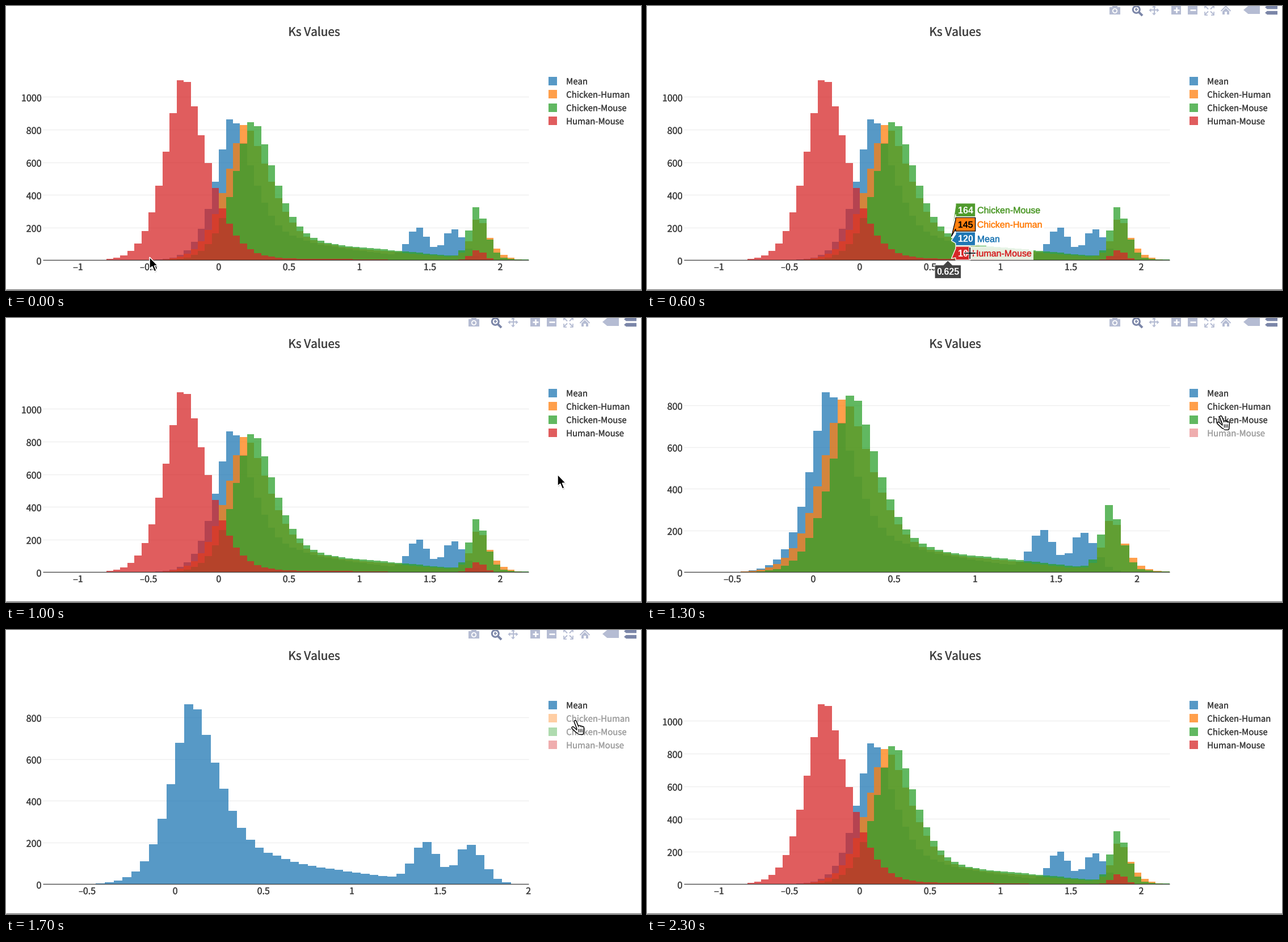
Animation, 1119 px wide and 501 px high, one loop 2.4 s. Source, as a matplotlib script:

```python
import itertools
import math

import matplotlib.patheffects as pe
import matplotlib.pyplot as plt
import numpy as np
from matplotlib.animation import FuncAnimation
from matplotlib.patches import Circle, Polygon, Rectangle

W, H, FRAMES, STEP = 1119, 501, 24, 100
LEFT, RIGHT, BASE, PEAK = 65, 921, 448.4, 317
X0, BIN, NBINS = -1.25, 0.05, 69
EDGES = X0 + BIN * np.arange(NBINS + 1)
MIDS = EDGES[:-1] + BIN / 2
UI, SANS = "Noto Sans CJK JP", "Liberation Sans"
INK, FADED, ICON, ACTIVE = "#404040", "#a1a1a1", "#b5bcd3", "#7b86a8"


def hump(height, mid, left, right, power=2.0):
    """A bell with its own width on either side."""
    d = MIDS - mid
    return height * np.exp(-np.abs(d / np.where(d < 0, left, right)) ** power)


def counts(lo, hi, *humps):
    n = np.maximum(np.round(sum(humps)), 2)
    return np.where((MIDS > lo) & (MIDS < hi), n, 0)


SERIES = [
    ("Mean", "#1f77b4", counts(
        -0.75, 2.0, hump(890, 0.09, 0.16, 0.243, 1.45),
        hump(81.5, 0.62, 0.2, 0.65),
        hump(185, 1.415, 0.094, 0.1), hump(185, 1.66, 0.085, 0.115))),
    ("Chicken-Human", "#ff7f0e", counts(
        -0.8, 2.2, hump(835, 0.185, 0.2, 0.275, 1.55),
        hump(70, 0.85, 0.3, 0.7), hump(262, 1.84, 0.069, 0.108, 1.5))),
    ("Chicken-Mouse", "#2ca02c", counts(
        -0.65, 2.2, hump(860, 0.24, 0.191, 0.2385, 1.55),
        hump(82, 0.8, 0.3, 0.8), hump(310, 1.83, 0.07, 0.096, 1.8))),
    ("Human-Mouse", "#d62728", counts(
        -1.25, 2.2, hump(1139, -0.255, 0.18, 0.238, 1.53),
        hump(9, 0.6, 0.5, 0.6), hump(62, 1.84, 0.069, 0.067))),
]
HOVER = ["#1f77b4", "#ff7f0e", "#509b2d", "#d62728"]

# Frames between which each trace is switched off.
HIDDEN = [(FRAMES, FRAMES), (16, 18), (14, 19), (13, 21)]
# Cursor tip: frame, x, y.
PATH = [(0, 253, 443), (1, 218, 425), (4, 420, 400), (6, 569, 436),
        (10, 972, 276), (13, 1010, 173), (16, 1002, 160), (18, 1002, 160),
        (20, 1002, 208), (22, 1006, 170)]

ARROW = np.array([(0, 0), (0, 20.5), (4.7, 16.4), (8.4, 25.4), (12, 23.8),
                  (8.3, 15.2), (14.6, 15.2)])

fig = plt.figure(figsize=((W + 1e-4) / 72, (H + 1e-4) / 72), dpi=72,
                 facecolor="white")
ax = fig.add_axes([0, 0, 1, 1])
order = itertools.count(1)


def poly(pts, fill, edge="none", lw=0.0, **kw):
    ax.add_patch(Polygon(pts, closed=True, facecolor=fill, edgecolor=edge,
                         linewidth=lw, zorder=next(order), **kw))


def rect(x, y, w, h, fill, **kw):
    ax.add_patch(Rectangle((x, y), w, h, facecolor=fill, edgecolor="none",
                           linewidth=0, zorder=next(order), **kw))


def disc(x, y, r, fill, edge="none", lw=0.0):
    ax.add_patch(Circle((x, y), r, facecolor=fill, edgecolor=edge,
                        linewidth=lw, zorder=next(order)))


def line(xs, ys, color, lw, cap="butt"):
    ax.plot(xs, ys, color=color, lw=lw, solid_capstyle=cap,
            zorder=next(order))


def text(x, y, s, size, color=INK, font=UI, ha="left", bold=False):
    """Text whose regular weight is thickened by a hairline."""
    effects = [] if bold else [pe.withStroke(linewidth=0.35,
                                             foreground=color)]
    return ax.text(x, y, s, fontsize=size, color=color, family=font, ha=ha,
                   va="baseline", weight="bold" if bold else "normal",
                   path_effects=effects, zorder=next(order))


def width(t):
    return t.get_window_extent().width


class View:
    """Maps data to pixels for a set of visible traces."""

    def __init__(self, shown):
        tops = np.max([SERIES[i][2] for i in shown], axis=0)
        used = np.nonzero(tops)[0]
        self.lo, self.hi = EDGES[used[0]], EDGES[used[-1] + 1]
        self.kx = (RIGHT - LEFT) / (self.hi - self.lo)
        self.top = tops.max()
        self.ky = PEAK / self.top

    def x(self, v):
        return LEFT + (v - self.lo) * self.kx

    def y(self, v):
        return BASE - v * self.ky


def draw_grid(v):
    for n in range(200, int(v.top) + 1, 200):
        line([LEFT, RIGHT], [v.y(n)] * 2, "#eeeeee", 1.3)


def draw_bars(v, shown):
    for i in shown:
        _, color, n = SERIES[i]
        xs = np.repeat(v.x(EDGES), 2)
        ys = np.concatenate([[BASE], np.repeat(v.y(n), 2), [BASE]])
        pts = np.column_stack([np.clip(xs, LEFT, RIGHT), ys])
        poly(pts, color, alpha=0.75)
    line([LEFT, RIGHT], [BASE] * 2, INK, 1.3)


def draw_ticks(v):
    for n in range(0, int(v.top) + 1, 200):
        text(62.4, v.y(n) + 7.6, str(n), 16.2, ha="right")
    first, last = math.ceil(v.lo * 2), math.floor(v.hi * 2 + 1e-6)
    for k in range(first, last + 1):
        x = v.x(k / 2) - 0.4
        shift = 4.5 if k < 0 else 0
        t = text(x + shift, 466, f"{abs(k) / 2:g}", 16, ha="center")
        if k < 0:
            left = x - width(t) / 2 - 3.8
            line([left, left + 7.4], [461, 461], INK, 1.4)


def draw_legend(shown):
    for i, (name, color, _) in enumerate(SERIES):
        y = 132.4 + 23.5 * i
        on = i in shown
        rect(955.8, y - 7.6, 15, 15, color, alpha=0.75 if on else 0.375)
        text(987.2, y + 5.8, name, 14.9, INK if on else FADED)


def draw_modebar():
    # camera
    rect(815, 2, 19, 13, ICON)
    rect(820, 0, 9, 3, ICON)
    disc(824.5, 8.5, 4.6, "white")
    disc(824.5, 8.5, 2.8, ICON)
    # zoom
    line([866, 873], [10, 17], ACTIVE, 4)
    disc(862.3, 6.3, 6, "white", ACTIVE, 3)
    line([859.5, 865], [6.3, 6.3], ACTIVE, 1.7)
    line([862.3, 862.3], [3.5, 9], ACTIVE, 1.7)
    # pan
    line([886, 901], [7.5, 7.5], ICON, 2)
    line([893.5, 893.5], [0, 15], ICON, 2)
    for dx, dy in ((1, 0), (-1, 0), (0, 1), (0, -1)):
        tip = np.array([893.5 + 9 * dx, 7.5 + 9 * dy])
        back = tip - 4 * np.array([dx, dy])
        side = 3.6 * np.array([dy, dx])
        poly([tip, back + side, back - side], ICON)
    # zoom in and out
    for x in (924, 953):
        rect(x, -1, 17, 16, ICON)
        line([x + 3.5, x + 13.5], [7, 7], "white", 2.6)
    line([932.5, 932.5], [2, 12], "white", 2.6)
    # autoscale
    for sx, sy in itertools.product((-1, 1), repeat=2):
        cx, cy = 991 + 9 * sx, 7.5 + 9 * sy
        line([991 + 2 * sx, cx - sx], [7.5 + 2 * sy, cy - sy], ICON, 2)
        line([cx - 6 * sx, cx - .8 * sx, cx - .8 * sx],
             [cy - .8 * sy, cy - .8 * sy, cy - 6 * sy], ICON, 1.7)
    # home
    line([1011.5, 1020, 1028.5], [9, 0.5, 9], ICON, 2)
    poly([(1014, 9.5), (1020, 3.5), (1026, 9.5), (1026, 15), (1014, 15)],
         ICON)
    rect(1018, 10.5, 4, 4.5, "white")
    # hover modes
    for x, y, w, r, color in ((1051, 7, 29, 7, ICON), (1089, 2.2, 22, 3.2,
                              ACTIVE), (1089, 12, 22, 3.2, ACTIVE)):
        poly([(x, y), (x + 1.2 * r, y - r), (x + w, y - r), (x + w, y + r),
              (x + 1.2 * r, y + r)], color)


def spread(ys, gap, lowest):
    """Nearest ordered positions at least `gap` apart, none below `lowest`."""
    blocks = []
    for i, y in enumerate(ys):
        blocks.append([y - i * gap, 1])
        while len(blocks) > 1 and blocks[-2][0] > blocks[-1][0]:
            b, m = blocks.pop()
            a, n = blocks.pop()
            blocks.append([(a * n + b * m) / (n + m), n + m])
    flat = np.repeat([b for b, _ in blocks], [n for _, n in blocks])
    last = len(ys) - 1
    return [min(p + i * gap, lowest - (last - i) * gap)
            for i, p in enumerate(flat)]


def hover_label(x, y, cy, name, value, color, ink):
    left = x + 7.4
    num = text(left + 4, cy + 5.8, str(value), 16, ink, SANS,
               bold=ink == "white")
    label = text(0, cy + 5.8, name, 16, color, SANS)
    right = left + width(num) + 8
    label.set_x(right + 3.2)
    rect(right, cy - 12, width(label) + 7, 24, "white", alpha=0.85)
    poly([(x, y), (left, cy + 8), (left, cy + 12), (right, cy + 12),
          (right, cy - 12), (left, cy - 12), (left, cy - 8)],
         color, ink, 1.3)
    for t in (num, label):
        t.set_zorder(next(order))


def draw_hover(v, shown, cx):
    k = math.floor((cx - 35 - v.x(X0)) / (BIN * v.kx))
    value = {i: int(SERIES[i][2][k]) for i in shown if SERIES[i][2][k]}
    hits = sorted(value, key=lambda i: -value[i])
    places = dict(zip(hits, spread([v.y(value[i]) for i in hits], 25.4, 436)))
    for i in sorted(hits):
        hover_label(v.x(EDGES[k + 1]), v.y(value[i]), places[i],
                    SERIES[i][0], value[i], HOVER[i],
                    "black" if i == 1 else "white")
    x = v.x(MIDS[k])
    t = text(x, 474, f"{MIDS[k]:.3f}".replace("-", "\u2212"), 16, "white",
             SANS, ha="center", bold=True)
    r = width(t) / 2 + 3
    poly([(x, 449), (x + 8, 457), (x + r, 457), (x + r, 480.5),
          (x - r, 480.5), (x - r, 457), (x - 8, 457)], "#444444", "white", 0.8)
    t.set_zorder(next(order))


def draw_hand(x, y):
    # Black strokes first, then thinner white ones leave an outline.
    for color, lw in (("black", 5.6), ("white", 2.6)):
        line([x + 1.2, x + 6.5], [y + 1.6, y + 15], color, lw, "round")
        line([x - 3, x + 5], [y + 12.6, y + 20], color, lw, "round")
        for i in range(3):
            line([x + 8.4 + 3 * i, x + 9 + 2.3 * i],
                 [y + 10.4 + 0.9 * i, y + 22.4], color, lw, "round")
    poly([(x + 5, y + 12), (x + 14, y + 13), (x + 13.4, y + 23.4),
          (x + 7.4, y + 23.4), (x + 4, y + 19)], "white")
    for dx in (7.2, 10, 12.8):
        line([x + dx, x + dx + .3], [y + 14.5, y + 20.5], "black", 1.2)


def draw_cursor(f, x, y):
    if 1 <= f <= 9:
        for color, lw, r in (("white", 4, 11), ("black", 1.7, 10)):
            line([x - r, x + r], [y, y], color, lw)
            line([x, x], [y - r, y + r], color, lw)
    elif f < 12:
        poly(ARROW + (x + 1, y + 2), "black", alpha=0.15)
        poly(ARROW + (x, y), "black", "white", 1.5)
    else:
        draw_hand(x, y)


def draw(f):
    global order
    order = itertools.count(1)
    ax.clear()
    ax.set_xlim(0, W)
    ax.set_ylim(H, 0)
    ax.axis("off")

    shown = [i for i, (a, b) in enumerate(HIDDEN) if not a <= f < b]
    v = View(shown)
    keys, px, py = zip(*PATH)
    cx, cy = np.interp(f, keys, px), np.interp(f, keys, py)

    line([0, W], [499.6] * 2, "#7c7c7c", 1.4)
    draw_grid(v)
    draw_bars(v, shown)
    draw_ticks(v)
    text(542.9, 52.7, "Ks Values", 20.8, ha="center")
    draw_legend(shown)
    if 1 <= f <= 22:
        draw_modebar()
    if 1 <= f <= 9:
        draw_hover(v, shown, cx)
    if f <= 22:
        draw_cursor(f, cx, cy)
    return []


anim = FuncAnimation(fig, draw, frames=FRAMES, interval=STEP, repeat=True,
                     repeat_delay=0, blit=False)
plt.show()
```
